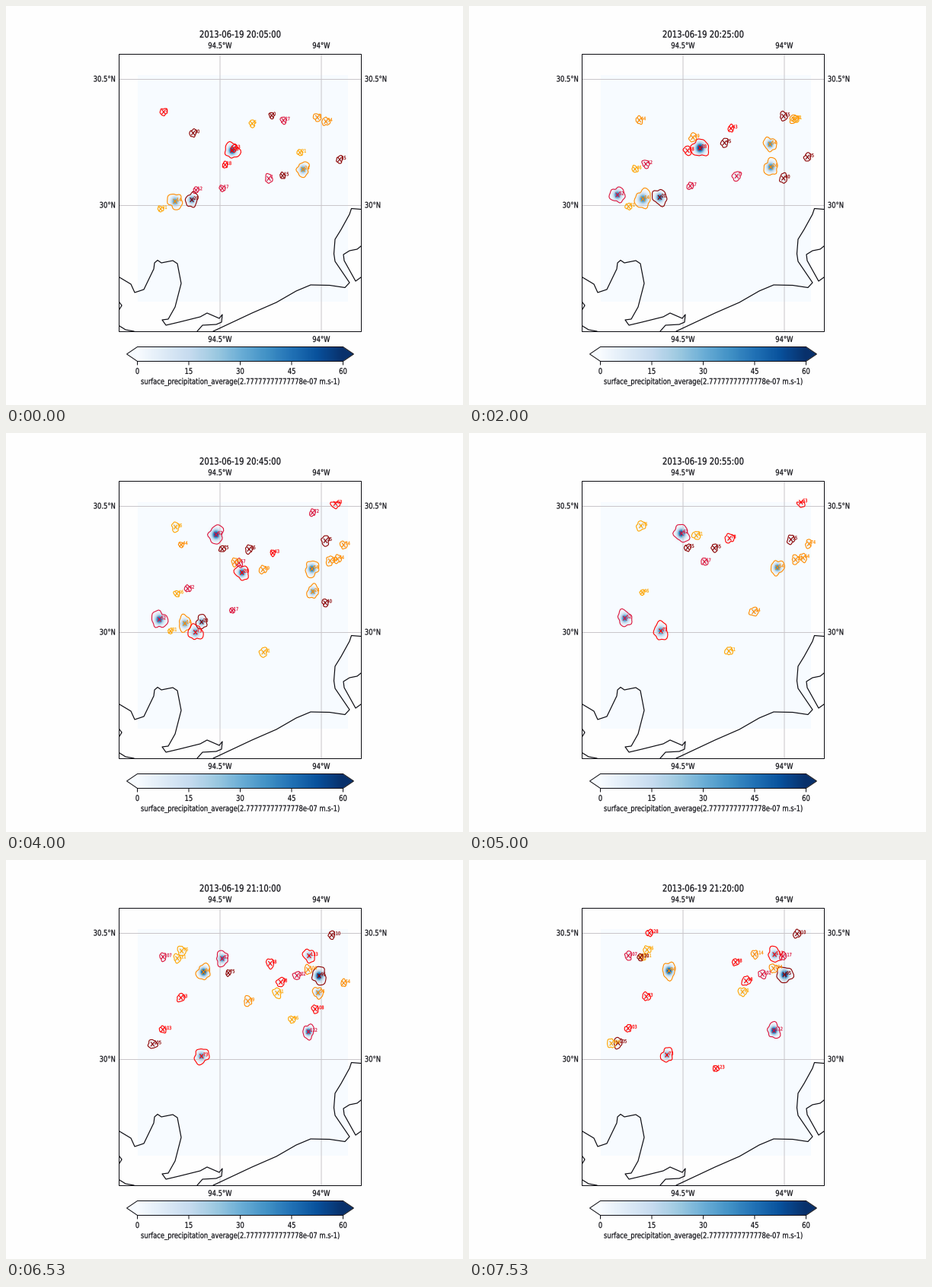
A matplotlib script for the animation above (8 s loop, 600 by 525 pixels).

```python
import numpy as np
import matplotlib.pyplot as plt
from matplotlib.animation import FuncAnimation
from matplotlib.patches import PathPatch, Polygon, Rectangle
from matplotlib.path import Path
from matplotlib.textpath import TextPath

plt.rcParams["path.snap"] = False
W, H = 600, 525
PX = 0.72             # one pixel in points at 100 dpi
ASPECT = 1.25         # the whole plot is taller than wide
STEPS = 16
INK, PAPER, GRID = "#0c0c12", "#fefefe", "#c9c6ca"
CELL_COLORS = ["darkred", "orange", "crimson", "red", "darkorange"]
RAIN = plt.get_cmap("Blues")
LEFT, RIGHT, TOP, BOTTOM = 173, 449, 91, 389

FLOW = np.array([1.6, -0.8])    # pixels per step
# Lasting cells: number and place of birth
STORMS = [
    (7, 345, 227), (14, 222, 257), (17, 284, 240), (20, 244, 255), (24, 390, 215),
    (28, 297, 190), (31, 203, 267), (34, 420, 152), (35, 438, 202), (40, 408, 229),
    (42, 228, 210), (43, 340, 163), (44, 220, 152), (46, 215, 216), (49, 292, 174),
    (52, 194, 249), (54, 395, 182), (55, 413, 145), (57, 300, 174), (59, 420, 171),
    (61, 333, 291), (62, 271, 136), (63, 428, 95), (64, 431, 168), (65, 315, 155),
    (73, 247, 263), (74, 442, 148), (75, 283, 153), (76, 222, 124), (78, 339, 140),
    (91, 352, 177), (93, 226, 183), (94, 256, 149), (95, 408, 154), (98, 358, 162),
    (102, 380, 153), (103, 204, 224), (104, 395, 145), (105, 191, 243),
    (107, 205, 128), (110, 427, 99), (112, 397, 226), (113, 398, 126),
    (120, 223, 129), (123, 323, 275), (128, 237, 96)]
HEAVY = {14, 20, 24, 28, 52, 54, 62, 73, 94, 95, 112, 113}


def make_cell(cid, place=None):
    """Numbers are handed out in order of appearance, so they give the birth."""
    rng = np.random.default_rng(cid)
    heavy = cid in HEAVY
    born = np.interp(cid, [35, 55, 69, 86, 113, 128], [0, 4, 6, 10, 13, 15])
    if place is None:
        place, life = (rng.uniform(185, 442), rng.uniform(105, 250)), rng.uniform(2, 3)
    else:
        life = 9.5 if heavy else rng.uniform(6, 9)
    size = rng.uniform(8.5, 11) if heavy else rng.uniform(3.8, 5.8)
    peak = rng.uniform(30, 66) if heavy else 1.6 * size
    return cid, np.array(place), born, life, size, peak


places = {cid: (x, y) for cid, x, y in STORMS}
CELLS = [make_cell(cid, places.get(cid)) for cid in range(129)
         if cid in places or cid % 3 == 0]


def outline(cid, step, size):
    """Closed, bumpy outline around the origin."""
    rng = np.random.default_rng([cid, step])
    a = np.linspace(0, 2 * np.pi, 31)[:-1]
    r = 1 + sum(amp * np.cos(k * a + rng.uniform(0, 2 * np.pi))
                for k, amp in ((2, .12), (3, .10), (5, .06), (7, .05)))
    return size * np.column_stack([r * np.cos(a), 1.15 * r * np.sin(a)])


def cells_at(step):
    """Yield number, place, size and peak rain of every live cell."""
    for cid, place, born, life, size, peak in CELLS:
        age = step - born
        if 0 <= age <= life:
            swell = .7 + .3 * np.sin(np.pi * (.2 + .8 * age / life))
            yield cid, place + FLOW * age, size * swell, peak * swell


fig = plt.figure(figsize=(W / 100, H / 100), dpi=100, facecolor=PAPER)
ax = fig.add_axes([0, 0, 1, 1])
gx, gy = np.meshgrid(np.arange(LEFT, RIGHT) + .5, np.arange(TOP, BOTTOM) + .5)


def text(x, y, s, size, color=INK, align=.5):
    """Text with its baseline at y; align is 0 left, .5 centre, 1 right."""
    path = TextPath((0, 0), s, size=size, prop={"family": "DejaVu Sans"})
    box = path.get_extents()
    verts = path.vertices * (1, -ASPECT) + (x - box.x0 - align * box.width, y)
    return ax.add_patch(PathPatch(Path(verts, path.codes), color=color, lw=.15, zorder=6))


def line(pts, color=INK, width=1.2, z=3):
    x, y = zip(*pts)
    ax.plot(x, y, color=color, lw=width * PX, zorder=z, solid_joinstyle="round")


def cross(x, y, color):
    dx, dy = 2.5, 3
    path = Path([(x - dx, y - dy), (x + dx, y + dy), (x - dx, y + dy), (x + dx, y - dy)],
                [Path.MOVETO, Path.LINETO] * 2)
    return ax.add_patch(PathPatch(path, fill=False, ec=color, lw=1.1 * PX, zorder=5))


field = ax.imshow(np.zeros(gx.shape), cmap=RAIN, vmin=0, vmax=60, aspect="auto",
                  extent=(LEFT, RIGHT, BOTTOM, TOP), interpolation="nearest", zorder=1)

# Coast
line([(272, 428), (323, 404), (355, 390), (381, 375), (400, 367), (425, 367.5),
      (445, 370.5), (451, 364), (432, 336), (430.5, 326), (432, 307), (440, 294),
      (451, 274), (453.5, 266.5), (466, 267.5)])
line([(466, 316), (461, 320), (451, 322), (443, 327), (444, 335), (459, 362), (466, 357)])
line([(149, 357), (164, 366), (169, 377), (181, 373), (194, 346), (195, 338), (199, 334.5),
      (204, 338), (219, 335), (225, 339), (230, 365), (222, 396), (213, 412), (205, 413),
      (210, 420), (227, 416), (255, 409), (264, 404), (280, 411), (284, 406), (283, 416),
      (276, 419), (258, 420), (251, 428)])
line([(149, 390), (152, 394), (149, 399)])
line([(149, 421), (157, 426), (168, 428)])

# Graticule and frame
for x, s in ((281, "94.5°W"), (414, "94°W")):
    line([(x, 64), (x, 428)], GRID, 1, 2)
    text(x, 55.5, s, 8.4)
    text(x, 442, s, 8.4)
for y, s in ((96.5, "30.5°N"), (262.5, "30°N")):
    line([(149, y), (466, y)], GRID, 1, 2)
    text(143, y + 3, s, 8.4, align=1)
    text(471.5, y + 3, s, 8.4, align=0)
ax.add_patch(Rectangle((148.5, 63.5), 318, 365, fill=False, ec=INK, lw=PX, zorder=7))

# Colour bar
ax.imshow(np.linspace(0, 1, 256)[None], cmap=RAIN, aspect="auto",
          extent=(172.5, 442.5, 467, 449), zorder=1)
for base, tip, end in ((172.5, 159, 0.0), (442.5, 456, 1.0)):
    ax.add_patch(Polygon([(base, 449), (tip, 458), (base, 467)], fc=RAIN(end), lw=0))
ax.add_patch(Polygon([(172.5, 448.5), (442.5, 448.5), (456.5, 458), (442.5, 467.5),
                      (172.5, 467.5), (158.5, 458)], fill=False, ec=INK, lw=PX, zorder=3))
for v in range(0, 61, 15):
    x = 172.5 + 4.5 * v
    line([(x, 468), (x, 472)], width=1)
    text(x, 484, str(v), 8.4)
text(307.5, 497.5, "surface_precipitation_average(2.77777777777778e-07 m.s-1)", 8.4)

ax.set(xlim=(0, W), ylim=(H, 0))
ax.axis("off")
live = []


def draw(step):
    while live:
        live.pop().remove()
    minutes = 20 * 60 + 5 + 5 * step
    live.append(text(307.5, 41.5, f"2013-06-19 {minutes // 60}:{minutes % 60:02d}:00", 10.08))
    rain = np.zeros(gx.shape)
    for cid, (x, y), size, peak in cells_at(step):
        if x > RIGHT + 1:
            continue
        color = CELL_COLORS[cid % 5]
        spread = .38 * size
        d = ((gx - x) / spread) ** 2 + ((gy - y) / (1.15 * spread)) ** 2
        rain = np.maximum(rain, peak * np.exp(-d / 2))
        pts = np.clip(outline(cid, step, size) + (x, y), (LEFT, TOP), (RIGHT, BOTTOM))
        live.append(ax.add_patch(Polygon(pts, fill=False, ec=color, lw=1.1 * PX,
                                         joinstyle="round", zorder=4)))
        live.append(cross(x, y, color))
        live.append(text(x + 2.6, y, str(cid), 5, color, 0))
    field.set_data(rain)
    return live


anim = FuncAnimation(fig, draw, frames=STEPS, interval=500, repeat=True,
                     repeat_delay=0, blit=False)
plt.show()
```
